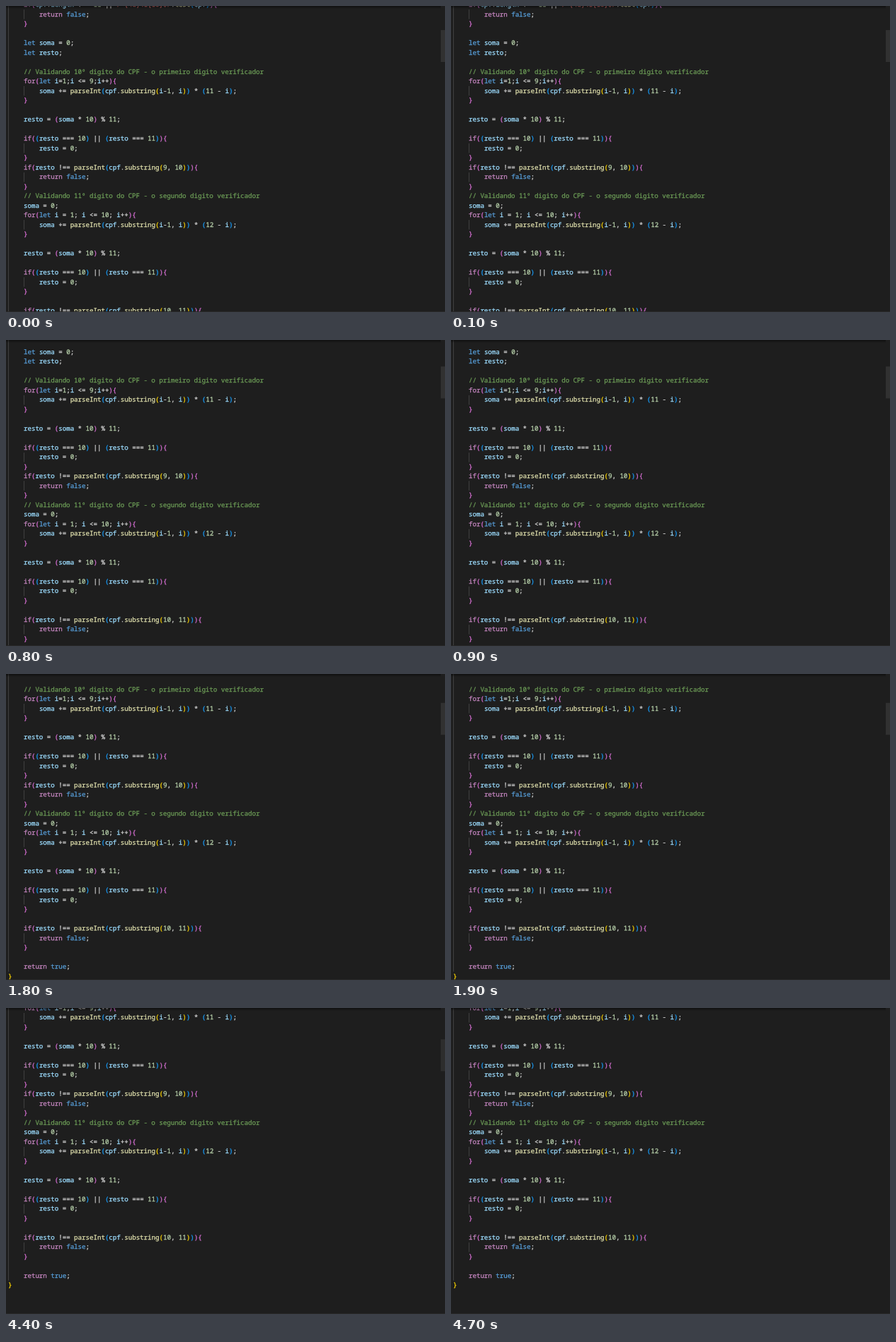
An HTML page with a canvas that plays this animation: 620 by 432 pixels, repeating every 5.2 s.

```html
<!DOCTYPE html>
<html lang="pt">
<head>
<meta charset="utf-8">
<style>
  html, body { margin: 0; width: 100%; height: 100%; overflow: hidden; background: #1e1e1e; }
  canvas { display: block; }
</style>
</head>
<body>
<canvas id="stage" width="620" height="432"></canvas>
<script>
const ctx = document.getElementById('stage').getContext('2d');
const W = 620, H = 432, LOOP = 5200;
const FONT_SIZE = 9.12, CHAR = 5.472, LINE = 13.5;
const LEFT = 3.1, TOP = -8.25, BASELINE = 9.65;
const SCROLL_STEP = 35.5, SCROLL_TIMES = [800, 1800, 3200];
const FADE_START = 4400;

const code = String.raw`
    if(cpf.length !== 11 || /^(\d)\1{10}$/.test(cpf)){
        return false;
    }

    let soma = 0;
    let resto;

    // Validando 10º digito do CPF - o primeiro digito verificador
    for(let i=1;i <= 9;i++){
        soma += parseInt(cpf.substring(i-1, i)) * (11 - i);
    }

    resto = (soma * 10) % 11;

    if((resto === 10) || (resto === 11)){
        resto = 0;
    }
    if(resto !== parseInt(cpf.substring(9, 10))){
        return false;
    }
    // Validando 11º digito do CPF - o segundo digito verificador
    soma = 0;
    for(let i = 1; i <= 10; i++){
        soma += parseInt(cpf.substring(i-1, i)) * (12 - i);
    }

    resto = (soma * 10) % 11;

    if((resto === 10) || (resto === 11)){
        resto = 0;
    }

    if(resto !== parseInt(cpf.substring(10, 11))){
        return false;
    }

    return true;
}`.slice(1).split('\n');

const BRACKETS = ['#ffd700', '#da70d6', '#179fff'];
const RULES = [
  [/^\/\//, '#6a9955'],
  [/^\/\^/, '#d16969'],
  [/^(if|for|return)$/, '#c586c0'],
  [/^(let|true|false)$/, '#569cd6'],
  [/^(parseInt|substring|test)$/, '#dcdcaa'],
  [/^\d/, '#b5cea8'],
  [/^[a-z]/i, '#9cdcfe'],
];
const TOKEN = /\/\/.*|\/\^.*?\$\/|[a-z]+|\d+|[(){}]|[^\sa-z\d(){}]+/gi;

// The code sits inside a function body, so bracket depth starts at one.
let depth = 1;
function tokenColor(text) {
  if (/^[({]$/.test(text)) return BRACKETS[depth++ % 3];
  if (/^[)}]$/.test(text)) return BRACKETS[--depth % 3];
  const rule = RULES.find(([pattern]) => pattern.test(text));
  return rule ? rule[1] : '#d4d4d4';
}

const lines = code.map(line => ({
  indent: line.search(/\S/),
  tokens: [...line.matchAll(TOKEN)].map(m => ({
    text: m[0], x: LEFT + m.index * CHAR, color: tokenColor(m[0]),
  })),
}));

const shadow = ctx.createLinearGradient(0, 0, 0, 4);
shadow.addColorStop(0, 'rgba(0,0,0,.5)');
shadow.addColorStop(1, 'rgba(0,0,0,0)');

function rect(color, x, y, w, h) {
  ctx.fillStyle = color;
  ctx.fillRect(x, y, w, h);
}

// A thin outline gives the text a medium weight.
function drawToken({ text, x, color }, y) {
  ctx.fillStyle = ctx.strokeStyle = color;
  ctx.fillText(text, x, y);
  ctx.strokeText(text, x, y);
}

function draw(time) {
  const step = SCROLL_TIMES.filter(t => time >= t).length;
  const top = TOP - step * SCROLL_STEP;

  rect('#1e1e1e', 0, 0, W, H);
  rect('#404040', 3, 0, 1, top + (lines.length - 1) * LINE);

  ctx.font = `${FONT_SIZE}px "Noto Sans Mono", monospace`;
  ctx.textRendering = 'geometricPrecision';
  ctx.lineWidth = 0.3;
  ctx.lineJoin = 'round';
  lines.forEach(({ indent, tokens }, i) => {
    const y = top + i * LINE;
    if (indent === 8) rect('#404040', 25, Math.round(y), 1, LINE);
    for (const token of tokens) drawToken(token, y + BASELINE);
  });

  rect(shadow, 0, 0, 614, 4);
  rect('#282828', 0, H - 1, W, 1);

  const fadeSteps = Math.max(0, Math.floor((time - FADE_START) / 100) + 1);
  const alpha = 0.22 * Math.max(0, 1 - fadeSteps / 4);
  rect(`rgba(121,121,121,${alpha})`, 614, 34 + step * 3.4, 6, 45);
}

function frame(now) {
  draw(now % LOOP);
  requestAnimationFrame(frame);
}
draw(0);
requestAnimationFrame(frame);
</script>
</body>
</html>
```
